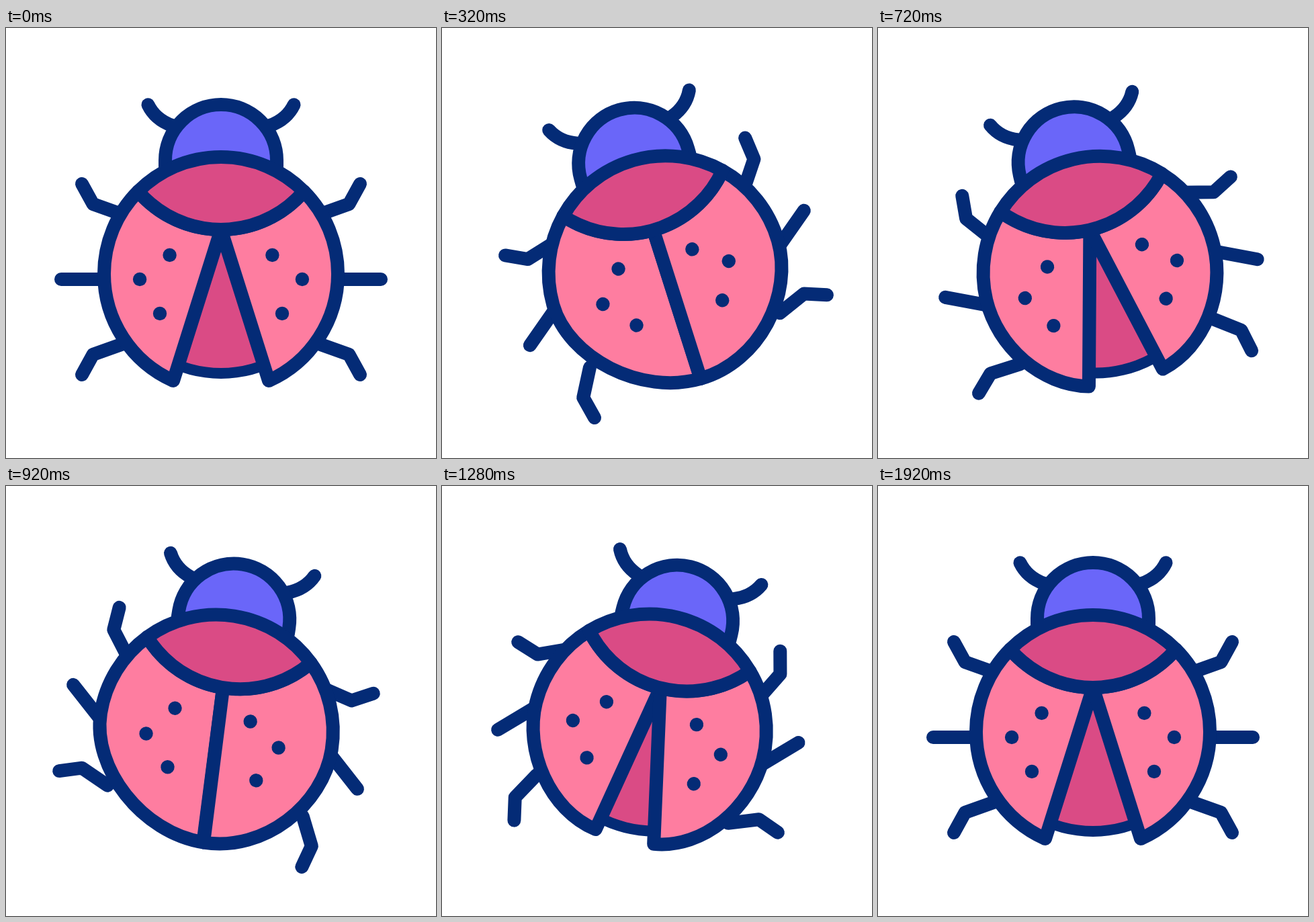
Animation of 640 by 640 pixels, one loop 2000 ms. Source, as an HTML page with a canvas:

```html
<!DOCTYPE html>
<html lang="en">
<head>
<meta charset="utf-8">
<title>Ladybug</title>
<style>
  html, body { margin: 0; width: 100%; height: 100%; overflow: hidden; background: #fff; }
  canvas { display: block; width: 640px; height: 640px; }
</style>
</head>
<body>
<canvas id="stage" width="640" height="640"></canvas>
<script>
const ctx = document.getElementById('stage').getContext('2d');
const LOOP = 2000, STEP = 40;
const NAVY = '#042b76', PINK = '#fe7da0', ROSE = '#da4b85', BLUE = '#6a66f9';
const RAD = Math.PI / 180;
const MID = 320, BODY_Y = 366, BODY_R = 174, SEAM_Y = 138, SEAM_R = 162;
const JOINT_X = 123.2, JOINT_Y = 243.2;

// Keys are [ms, value]
const SWAY = [[0, 0], [540, -25], [1043, 15], [1217, 15], [1644, 0]];
// The wings close and open again in turn
const FLAP = [0, 322, 642, 910, 1158, 1453, 1748].map((ms, i) => [ms, i % 2]);

const mix = (a, b, k) => a + (b - a) * k;

function valueAt(keys, t) {
  const i = keys.findIndex(([ms]) => t < ms);
  if (i === 0) return keys[0][1];
  if (i < 0) return keys[keys.length - 1][1];
  const [t0, a] = keys[i - 1], [t1, b] = keys[i];
  const k = (t - t0) / (t1 - t0);
  return mix(a, b, k * k * (3 - 2 * k));
}

// Each row of legs follows the one ahead of it
const legSwing = row => [
  [30 * row, 0], [375, -38 - 4 * row], [833 + 50 * row, 45],
  [1233 + 50 * row, -45], [1621 + 108 * row, 0]
];

function legPoints(row) {
  const y = 374, v = row - 1;
  if (!v) return [[146, y], [82, y]];
  return [[173, y + 96.5 * v], [129.5, y + 112 * v], [113, y + 142 * v]];
}

function turn(x, y, deg) {
  ctx.translate(x, y);
  ctx.rotate(deg * RAD);
  ctx.translate(-x, -y);
}

function paint(fill, width = 20) {
  if (fill) {
    ctx.fillStyle = fill;
    ctx.fill();
  }
  if (width) {
    ctx.lineWidth = width;
    ctx.stroke();
  }
}

function drawLegs(t) {
  for (let row = 0; row < 3; row++) {
    const angle = valueAt(legSwing(row), t);
    for (const s of [-1, 1]) {
      const pts = legPoints(row).map(([x, y]) => [MID + s * (MID - x), y]);
      ctx.save();
      turn(...pts[0], angle);
      ctx.beginPath();
      pts.forEach(p => ctx.lineTo(...p));
      paint();
      ctx.restore();
    }
  }
}

function drawHead() {
  for (const s of [-1, 1]) {
    ctx.beginPath();
    ctx.moveTo(MID + s * 108.5, 114.3);
    ctx.quadraticCurveTo(MID + s * 98, 136, MID + s * 73, 145);
    paint();
  }
  ctx.beginPath();
  ctx.moveTo(237, 206);
  ctx.arc(MID, 197, 83, Math.PI, 0);
  ctx.lineTo(403, 206);
  paint(BLUE);
}

function drawBelly() {
  ctx.beginPath();
  ctx.moveTo(MID, 300);
  ctx.arc(MID, 340, BODY_R, 45 * RAD, 135 * RAD);
  paint(ROSE, 0);
  ctx.beginPath();
  ctx.arc(MID, 340, BODY_R, 60 * RAD, 120 * RAD);
  paint(null, 16);
}

// Angle of a shoulder joint seen from a circle's centre height
const jointAngle = (s, y) => Math.atan2(JOINT_Y - y, s * JOINT_X);

function drawWing(s, w) {
  const tipX = mix(MID + s * 71, 327, w), tipY = mix(525, 532, w);
  const side = MID + s * BODY_R;
  const reach = s * mix(62.7, 92, w), lift = 28 * (1 - w) ** 2;
  ctx.beginPath();
  ctx.moveTo(MID, 300);
  ctx.lineTo(tipX, tipY);
  ctx.bezierCurveTo(tipX + reach, tipY - lift, side, mix(434.6, 449, w), side, BODY_Y);
  ctx.arc(MID, BODY_Y, BODY_R, s < 0 ? Math.PI : 0, jointAngle(s, BODY_Y), s > 0);
  ctx.arc(MID, SEAM_Y, SEAM_R, jointAngle(s, SEAM_Y), Math.PI / 2, s < 0);
  ctx.closePath();
  paint(PINK);
}

function drawCollar() {
  ctx.beginPath();
  ctx.arc(MID, BODY_Y, BODY_R, jointAngle(-1, BODY_Y), jointAngle(1, BODY_Y));
  ctx.arc(MID, SEAM_Y, SEAM_R, jointAngle(1, SEAM_Y), jointAngle(-1, SEAM_Y));
  ctx.closePath();
  paint(ROSE);
}

function drawSpots(s, w) {
  ctx.save();
  if (s < 0) turn(265.3, 287, -11.4 * w);
  else turn(442, 662, -5.1 * w);
  ctx.fillStyle = NAVY;
  for (const [x, y] of [[76.4, 338], [120.9, 374], [91, 425]]) {
    ctx.beginPath();
    ctx.arc(MID + s * x, y, 10.2, 0, Math.PI * 2);
    ctx.fill();
  }
  ctx.restore();
}

function draw(t) {
  const w = valueAt(FLAP, t);
  ctx.fillStyle = '#fff';
  ctx.fillRect(0, 0, 640, 640);
  ctx.save();
  ctx.strokeStyle = NAVY;
  ctx.lineCap = ctx.lineJoin = 'round';
  turn(MID, 320, valueAt(SWAY, t));
  drawLegs(t);
  drawHead();
  drawBelly();
  for (const s of [-1, 1]) drawWing(s, w);
  drawCollar();
  for (const s of [-1, 1]) drawSpots(s, w);
  ctx.restore();
}

const start = performance.now();
function tick() {
  const t = (performance.now() - start) % LOOP;
  draw(Math.floor(t / STEP) * STEP);
  requestAnimationFrame(tick);
}
tick();
</script>
</body>
</html>
```
